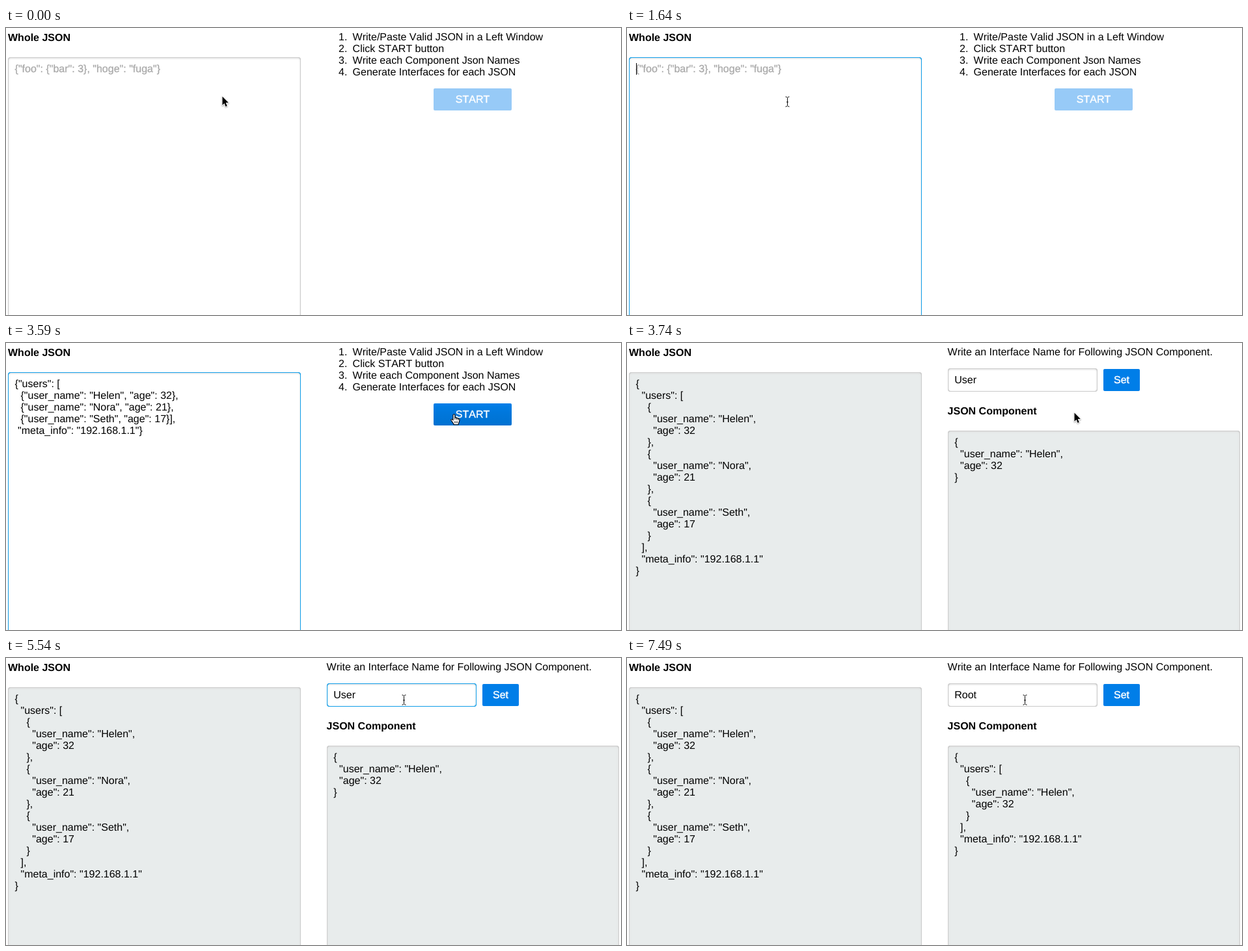
Recreate the animation shown at these times as an HTML page with a canvas. Size 945 px wide and 442 px high, loop 8 s.

```html
<!DOCTYPE html>
<html lang="en">
<head>
<meta charset="utf-8">
<title>JSON to interfaces</title>
<style>
html, body { margin: 0; width: 100%; height: 100%; overflow: hidden; background: #fff; }
canvas { display: block; }
</style>
</head>
<body>
<canvas id="stage" width="945" height="442"></canvas>
<script>
const LOOP = 8000, STEP = 150, LINE = 18;
const ctx = document.getElementById('stage').getContext('2d');
const FAMILY = '"Liberation Sans", Arial, Helvetica, sans-serif';
const BLUE = '#007ee8', FOCUS = '#129fea';

const people = [['Helen', 32], ['Nora', 21], ['Seth', 17]]
  .map(([user_name, age]) => ({ user_name, age }));
const meta_info = '192.168.1.1';
const pretty = value => JSON.stringify(value, null, 2).split('\n');
const wholeJson = pretty({ users: people, meta_info });
const userJson = pretty(people[0]);
const rootJson = pretty({ users: [people[0]], meta_info });

const personLine = p => `{"user_name": "${p.user_name}", "age": ${p.age}}`;
const pasted = [
  '{"users": [',
  ...people.map((p, i) => '  ' + personLine(p) + (i < 2 ? ',' : '],')),
  ` "meta_info": "${meta_info}"}`
];
const steps = [
  'Write/Paste Valid JSON in a Left Window',
  'Click START button',
  'Write each Component Json Names',
  'Generate Interfaces for each JSON'
];

// Pointer moves in discrete steps between hot spots
const moves = [
  { at: 600, count: 4, from: [332, 105], to: [246, 113] },
  { at: 2540, count: 5, from: [246, 113], to: [688, 109] },
  { at: 3740, count: 1, from: [688, 109], to: [687, 107] },
  { at: 4190, count: 4, from: [687, 107], to: [611, 64] }
];

const arrowPath = new Path2D('M0 0V13.2L3 10.4L5 15.4L7.3 14.4L5.2 9.6H9.4Z');
const beamPath = new Path2D('M-3 -7.5H-1.5L0 -6L1.5 -7.5H3M0 -6V6M-3 7.5H-1.5L0 6L1.5 7.5H3M-1.5 .5H1.5');
const handPath = new Path2D('M-1.5 9.5V1.6C-1.5 -.2 1.3 -.2 1.3 1.6V5.6C2.5 4.9 3.6 5.4 3.8 6.4' +
  'C5 5.7 6.1 6.3 6.3 7.3C7.6 6.8 8.5 7.6 8.5 8.8C8.5 12 6.6 13 6.6 16.2H-.4' +
  'C-.6 13.8 -3.4 12 -4.5 9.4C-5 8 -3.2 7.2 -1.5 9.5Z');
const fingerPath = new Path2D('M1.3 5.6V8.5M3.8 6.4V9M6.3 7.3V9.5M1 11V14M3 11V14M5 11V14');

const within = (t, ...spans) => spans.some(([a, b]) => t >= a && t < b);

function text(str, x, y, { color = '#000', bold = false, thicken = 0 } = {}) {
  ctx.font = `${bold ? 'bold ' : ''}16px ${FAMILY}`;
  ctx.fillStyle = ctx.strokeStyle = color;
  ctx.fillText(str, x, y);
  if (thicken) {
    ctx.lineWidth = thicken;
    ctx.strokeText(str, x, y);
  }
}

function lines(list, x, y) {
  list.forEach((str, i) => text(str, x, y + i * LINE));
}

function roundBox(x, y, w, h, r) {
  ctx.beginPath();
  ctx.roundRect(x, y, w, h, r);
}

function field(x, y, w, h, { fill = '#fff', border = '#ccc' } = {}) {
  roundBox(x, y, w, h, 4);
  ctx.fillStyle = fill;
  ctx.fill();
  ctx.save();
  ctx.clip();
  ctx.shadowColor = '#ddd';
  ctx.shadowBlur = 3;
  ctx.shadowOffsetY = 1;
  ctx.strokeStyle = border;
  ctx.lineWidth = 6;
  roundBox(x - 2, y - 2, w + 4, h + 4, 6);
  ctx.stroke();
  ctx.restore();
  // Restore the inside edge, leaving only a one-pixel border
  roundBox(x + .5, y + .5, w - 1, h - 1, 3.5);
  ctx.strokeStyle = border;
  ctx.lineWidth = 1;
  ctx.stroke();
}

function button(label, x, y, w, { enabled = true, hover = false } = {}) {
  roundBox(x, y, w, 34, 2);
  ctx.fillStyle = enabled ? BLUE : '#97caf7';
  ctx.fill();
  if (hover) {
    const shade = ctx.createLinearGradient(0, y, 0, y + 34);
    shade.addColorStop(0, 'rgba(0,0,0,0)');
    shade.addColorStop(.4, 'rgba(0,0,0,.05)');
    shade.addColorStop(1, 'rgba(0,0,0,.1)');
    ctx.fillStyle = shade;
    ctx.fill();
  }
  ctx.textAlign = 'center';
  text(label, x + w / 2, y + 22, { color: '#fff', thicken: .4 });
  ctx.textAlign = 'left';
}

function caret(x, y) {
  ctx.fillStyle = '#000';
  ctx.fillRect(Math.round(x), y, 1, LINE);
}

function pointerAt(t) {
  const move = moves.filter(m => t >= m.at).pop();
  if (!move) return moves[0].from;
  const done = Math.min(1, (Math.floor((t - move.at) / STEP) + 1) / move.count);
  const eased = done * done * (3 - 2 * done);
  return move.from.map((a, i) => Math.round(a + (move.to[i] - a) * eased));
}

function pointerKind(t, x, y) {
  if (t < 600) return 'arrow';
  if (t < 3740) return x < 453 ? 'beam' : x >= 657 ? 'hand' : 'arrow';
  return y < 75 && x < 723 ? 'beam' : 'arrow';
}

function drawPointer(kind, x, y) {
  const draw = (path, color, width) => {
    ctx.strokeStyle = color;
    ctx.lineWidth = width;
    ctx.stroke(path);
  };
  ctx.save();
  ctx.translate(x + .5, y + .5);
  ctx.lineJoin = 'round';
  if (kind === 'beam') {
    draw(beamPath, 'rgba(255,255,255,.6)', 2);
    draw(beamPath, '#111', 1);
  } else if (kind === 'hand') {
    ctx.fillStyle = '#fff';
    ctx.fill(handPath);
    draw(handPath, '#000', 1.1);
    draw(fingerPath, '#000', .8);
  } else {
    ctx.shadowColor = 'rgba(0,0,0,.35)';
    ctx.shadowBlur = 2;
    ctx.shadowOffsetY = 1;
    draw(arrowPath, '#fff', 2);
    ctx.shadowColor = 'transparent';
    ctx.fillStyle = '#000';
    ctx.fill(arrowPath);
  }
  ctx.restore();
}

function drawEntry(t, hover) {
  const filled = t >= 2090;
  field(3, 45, 450, 420, { border: t >= 1050 ? FOCUS : '#ccc' });
  if (filled) lines(pasted, 13.6, 68);
  else text('{"foo": {"bar": 3}, "hoge": "fuga"}', 13.6, 68, { color: '#a9a9a9', thicken: .3 });
  if (within(t, [1050, 1200], [1640, 2540], [2990, 3590])) {
    const last = pasted.length - 1;
    if (filled) caret(13.6 + ctx.measureText(pasted[last]).width, 54 + last * LINE);
    else caret(13.6, 54);
  }
  lines(steps.map((_, i) => `${i + 1}.`), 511, 19);
  lines(steps, 532.6, 19);
  button('START', 657, 93, 120, { enabled: filled, hover });
}

function typedName(t) {
  if (t >= 7490) return 'Root';
  const extra = t < 6440 ? 0 : t < 6590 ? 1 : t < 6890 ? 2 : 4;
  return 'User' + 'Data'.slice(0, extra);
}

function drawNaming(t) {
  const locked = { fill: '#e8ecec' };
  const name = typedName(t);
  field(3, 45, 450, 420, locked);
  lines(wholeJson, 13.6, 68);
  text('Write an Interface Name for Following JSON Component.', 492.6, 19);
  field(493, 39, 230, 36, { border: within(t, [5090, 7490]) ? FOCUS : '#ccc' });
  text(name, 503.2, 62);
  if (within(t, [5090, 5540], [6140, 7340])) caret(503.2 + ctx.measureText(name).width, 48);
  button('Set', 732, 40, 56);
  text('JSON Component', 492.6, 110, { bold: true });
  field(493, 135, 449, 330, locked);
  lines(t < 7490 ? userJson : rootJson, 503.2, 158);
}

function render(t) {
  ctx.fillStyle = '#fff';
  ctx.fillRect(0, 0, 945, 442);
  const [x, y] = pointerAt(t);
  const kind = pointerKind(t, x, y);
  text('Whole JSON', 3, 20, { bold: true });
  if (t < 3740) drawEntry(t, kind === 'hand');
  else drawNaming(t);
  drawPointer(kind, x, y);
}

function frame() {
  render(performance.now() % LOOP);
  requestAnimationFrame(frame);
}

ctx.fontKerning = 'none';
ctx.textRendering = 'geometricPrecision';
frame();
</script>
</body>
</html>
```
